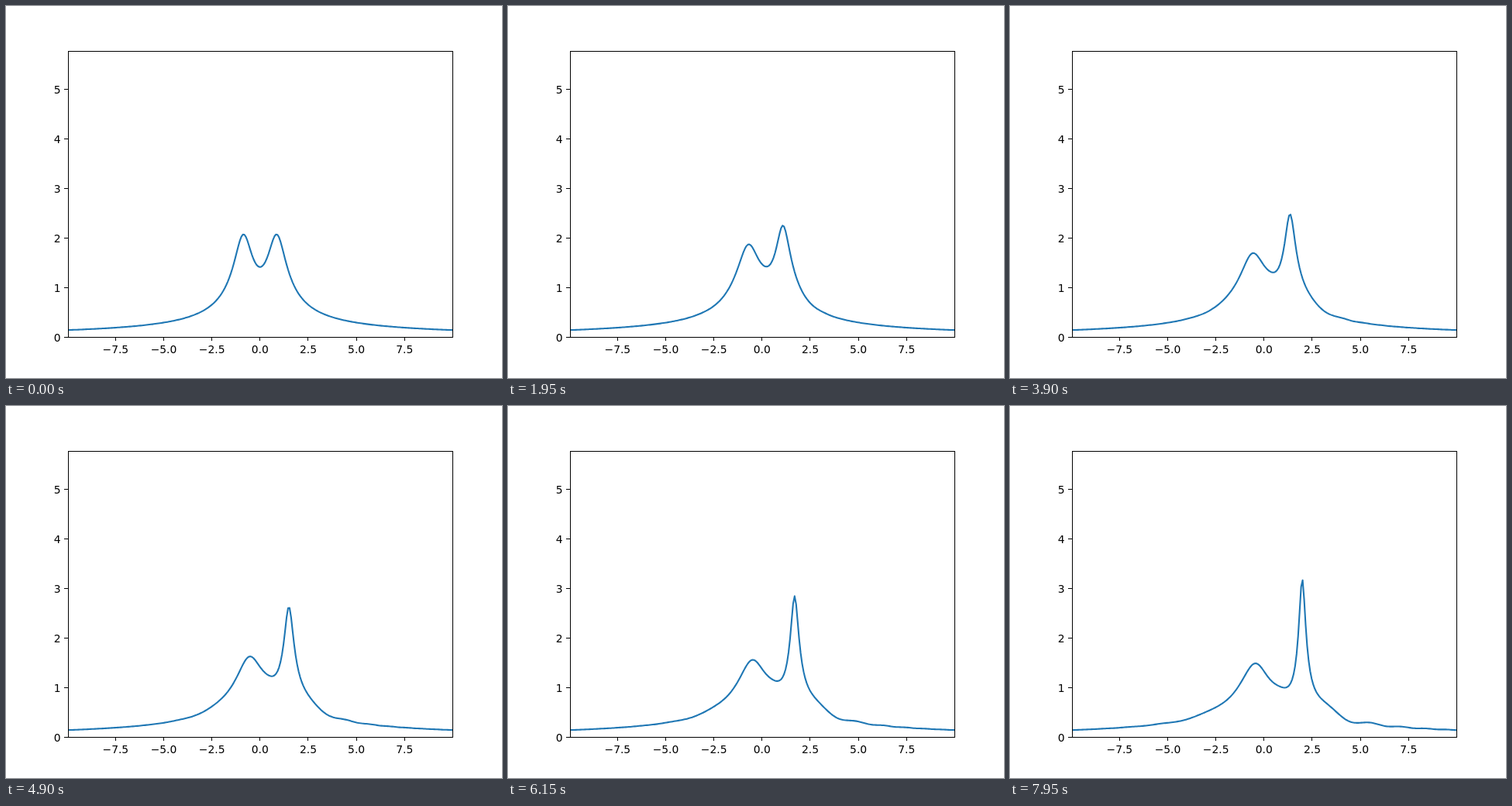
Recreate the animation shown at these times as an HTML page with a canvas. Size 640 px wide and 480 px high, loop 8 s.

```html
<!DOCTYPE html>
<html lang="en">
<head>
<meta charset="utf-8">
<title>Two-peak wave</title>
<style>
html, body { margin: 0; width: 100%; height: 100%; overflow: hidden; background: #fff; }
canvas { display: block; }
</style>
</head>
<body>
<canvas id="stage" width="640" height="480"></canvas>
<script>
const ctx = document.getElementById('stage').getContext('2d');
const LEFT = 80, RIGHT = 576, TOP = 58, BOTTOM = 427;
const ORIGIN_X = 327.8, UNIT_X = 24.86, ORIGIN_Y = 427.3, UNIT_Y = 63.95;
const LOOP = 8000, STEP = 50, SAMPLES = 255;

const bump = (distance, width) => Math.exp(-((distance / width) ** 2));

// Modulus of a rational two-soliton; s is the shift of the moving one.
function soliton(x, s) {
  const d = x - s;
  return Math.sqrt(2 * (d * d + 1) / ((x * d - 1) ** 2 + d * d));
}

// Dispersive ripple that spreads from the centre and flattens the peaks.
function ripple(x, s) {
  const t = s / 2;
  const spread = t + 0.15 * Math.exp(-t / 0.3);
  const side = Math.tanh(x);
  const k = x / (2 * spread);
  const envelope = (0.14 + 0.1 * side) / (1 + (k / 2) ** 4);
  const chirp = Math.cos(x * x / (4 * spread) - 0.3 - 0.3 * side);
  const valley = 0.5 * s + 0.07 * s * s;
  const peak = s / 2 + Math.sqrt(s * s / 4 + 0.75);
  return (1 - Math.exp(-t / 0.15)) *
    (0.23 * bump(x - valley, 0.75) - 0.07 * bump(x - peak, 0.35) - envelope * chirp);
}

function line(x1, y1, x2, y2) {
  ctx.beginPath();
  ctx.moveTo(x1, y1);
  ctx.lineTo(x2, y2);
  ctx.stroke();
}

function drawAxes() {
  ctx.strokeStyle = ctx.fillStyle = '#000';
  ctx.lineWidth = 1;
  ctx.font = '13.89px "DejaVu Sans", sans-serif';
  ctx.strokeRect(LEFT + 0.5, TOP + 0.5, RIGHT - LEFT, BOTTOM - TOP);
  ctx.textAlign = 'center';
  for (let v = -7.5; v <= 7.5; v += 2.5) {
    const x = ORIGIN_X + v * UNIT_X;
    const tick = Math.floor(x) + 0.5;
    line(tick, BOTTOM + 1, tick, BOTTOM + 5);
    ctx.fillText(v.toFixed(1).replace('-', '\u2212'), x, 448);
  }
  ctx.textAlign = 'right';
  for (let v = 0; v <= 5; v++) {
    const y = ORIGIN_Y - v * UNIT_Y;
    const tick = Math.floor(y) + 0.5;
    line(LEFT - 5, tick, LEFT, tick);
    ctx.fillText(v, 70.5, y + 5.2);
  }
}

function drawCurve(s) {
  ctx.save();
  ctx.beginPath();
  ctx.rect(LEFT, TOP, RIGHT - LEFT, BOTTOM - TOP);
  ctx.clip();
  ctx.beginPath();
  for (let i = 0; i <= SAMPLES; i++) {
    const px = LEFT + (RIGHT - LEFT) * i / SAMPLES;
    const x = (px - ORIGIN_X) / UNIT_X;
    ctx.lineTo(px, ORIGIN_Y - UNIT_Y * (soliton(x, s) + ripple(x, s)));
  }
  ctx.strokeStyle = '#1f77b4';
  ctx.lineWidth = 2.083;
  ctx.lineJoin = 'round';
  ctx.stroke();
  ctx.restore();
}

function draw() {
  const time = Math.floor(performance.now() % LOOP / STEP) * STEP;
  ctx.fillStyle = '#fff';
  ctx.fillRect(0, 0, 640, 480);
  drawCurve(0.195 * time / 1000);
  drawAxes();
  requestAnimationFrame(draw);
}
draw();
</script>
</body>
</html>
```
